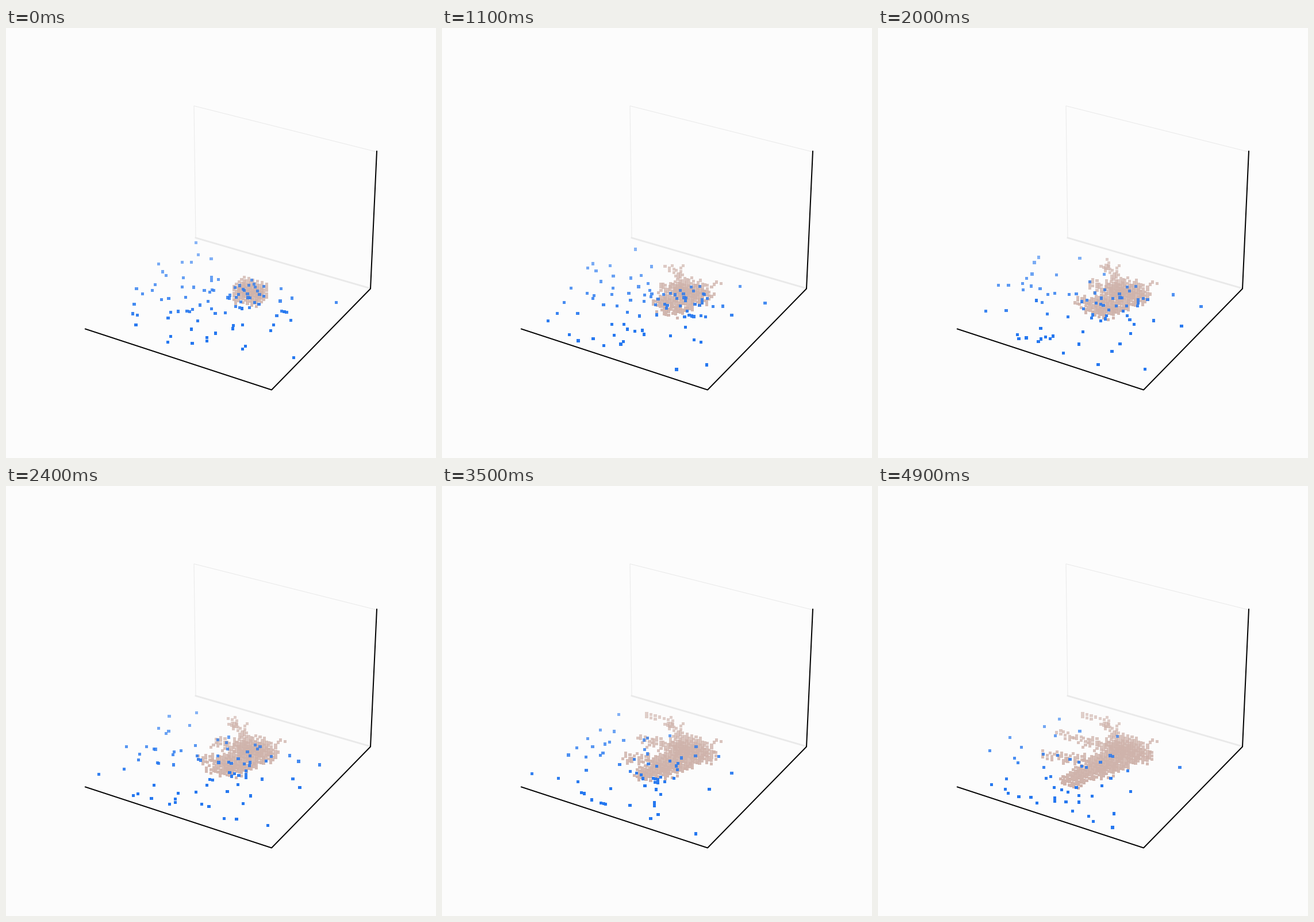
Recreate the animation shown at these times as a matplotlib script. Size 748x748 px, loop 5000 ms.

```python
import numpy as np
import matplotlib.pyplot as plt
from matplotlib.animation import FuncAnimation

SIZE, FRAMES, INTERVAL = 748, 50, 100
CELLS, LIFT = 40, 5.65                 # floor cells per side, pixels per layer
PAPER, BLUE, BROWN = "#fcfcfc", (0.15, 0.47, 0.94), (0.81, 0.70, 0.67)
ORIGIN = np.array([18.86, 16.96, 0])   # lattice position of the seed corner
WALKERS, RESTING = 82, 30

rng = np.random.default_rng(11)

# Perspective of the floor: lattice fractions to homogeneous pixels
FLOOR = np.array([[272.73, -204.13, 330],
                  [65.65, 112.02, 365],
                  [-0.04933, -0.0879, 1]])

# Branches of the aggregate: key points, first and last frame,
# half-widths along i, j, k and the number of particles caught
BRANCHES = [
    ([(2, 1, 0.5), (-1, 12, 1)], 2, 49, (2.6, 1.4, 1.2), 900),
    ([(6, -3, 1.5), (8, -3, 1.5)], 2, 47, (0.5, 1.6, 1.6), 150),
    ([(6, -4, 4), (8, -6, 4)], 1, 8, (0.5, 0.5, 0), 14),
    ([(-1, -5, 4), (-1, -7, 5)], 1, 6, (0.5, 0.5, 0), 8),
    ([(0, -5, 4), (-3, -5, 4), (-4, -8, 4), (-7, -8, 4), (-10, -8, 3)],
     1, 35, (0.5, 0.6, 0.8), 60),
    ([(-1, 0, 3), (-4, 1, 4), (-10, 2, 5)], 2, 49, (0.5, 0.8, 1.2), 75),
    ([(-1, 3, 1), (-6, 5, 1), (-10, 7, 2)], 8, 49, (0.6, 1, 1), 75),
]


def project(cells):
    """Lattice (i, j, k) to screen pixels."""
    uv1 = np.column_stack([cells[:, :2] / CELLS, np.ones(len(cells))])
    x, y, w = FLOOR @ uv1.T
    return np.column_stack([x / w, y / w - LIFT * cells[:, 2]])


def seed_block():
    """A solid block, then loose particles caught on its faces."""
    grid = np.mgrid[-1:7, -5:2, -1:5].reshape(3, -1).T
    outside = ((grid < (0, -4, 0)) | (grid > (5, 0, 4))).sum(axis=1)
    births = np.where(outside == 0, 0, rng.integers(0, 30, len(grid)))
    keep = (outside == 0) | ((outside == 1) & (rng.random(len(grid)) < 0.7))
    return grid[keep], births[keep]


def grow(points, first, last, width, count):
    """Particles scattered along a path, thinning toward its tip."""
    s = np.linspace(0, 1, count)
    knots = np.linspace(0, 1, len(points))
    centre = np.column_stack([np.interp(s, knots, axis)
                              for axis in zip(*points)])
    spread = rng.uniform(-1, 1, (count, 3)) * width
    cells = np.rint(centre + spread * (1.15 - 0.5 * s[:, None])).astype(int)
    return cells, np.rint(first + s * (last - first)).astype(int)


def aggregate():
    """All fixed cells, each with its earliest birth frame."""
    parts = [seed_block()] + [grow(*branch) for branch in BRANCHES]
    cells = np.vstack([c for c, _ in parts])
    births = np.concatenate([b for _, b in parts])
    order = np.argsort(births, kind="stable")
    cells, index = np.unique(cells[order], axis=0, return_index=True)
    return cells, births[order][index]


def walk():
    """Random walks on the lattice, drifting to the front left."""
    low, high = np.array([0, 3, 1]), np.array([39, 40, 3])
    cells = np.rint(rng.normal((17, 23, 2), (9, 8.5, 0.8), (WALKERS, 3)))
    path = []
    for _ in range(FRAMES):
        cells = np.where(cells < low, 2 * low - cells, cells)
        cells = np.where(cells > high, 2 * high - cells, cells)
        path.append(project(cells))
        drift = rng.random(cells.shape) < (0.05, 0.14, 0)
        cells = cells + rng.integers(-1, 2, cells.shape) + drift * (-1, 1, 0)
    return path


def shade(color, y, far):
    """Fade colours toward the back of the floor."""
    rgba = np.tile((*color, 1.0), (len(y), 1))
    rgba[:, 3] = np.interp(y, [390, 520], [far, 1])
    return rgba


cells, births = aggregate()
brown_xy = project(cells + ORIGIN)
order = np.argsort(brown_xy[:, 1])
brown_xy, births = brown_xy[order], births[order]

# A few particles pause on the aggregate before they turn brown
perch = rng.choice(len(births), RESTING, replace=False)
stay = rng.integers(5, 30, RESTING)

paths = walk()
lifetimes = rng.uniform(1, 150, WALKERS)

fig = plt.figure(figsize=(SIZE / 100, SIZE / 100), dpi=100, facecolor=PAPER)
ax = fig.add_axes([0, 0, 1, 1])
ax.set(xlim=(0, SIZE), ylim=(SIZE, 0))
ax.axis("off")


def line(points, color, width):
    x, y = np.array(points).T
    ax.plot(x, y + 0.5, color=color, lw=width * 0.72, zorder=1)


line([(330, 365), (327, 135), (645, 215)], "#e9e9e9", 1)
line([(330, 364.5), (634, 452.5)], "#e9e9e9", 2.8)
line([(138, 523), (462, 629), (634, 453), (645, 214)], "black", 2)

dot = dict(marker="s", s=(5.2 * 0.72) ** 2, linewidths=0)
brown = ax.scatter([], [], zorder=2, **dot)
blue = ax.scatter([], [], zorder=3, **dot)


def update(n):
    grown = brown_xy[births <= n]
    brown.set_offsets(grown + 0.5)
    brown.set_facecolors(shade(BROWN, grown[:, 1], 0.6))

    resting = (births[perch] <= n) & (n < births[perch] + stay)
    dots = np.vstack([paths[n][lifetimes > n], brown_xy[perch[resting]]])
    blue.set_offsets(dots + 0.5)
    blue.set_facecolors(shade(BLUE, dots[:, 1], 0.54))
    return brown, blue


anim = FuncAnimation(fig, update, frames=FRAMES, interval=INTERVAL,
                     repeat=True, repeat_delay=0)
plt.show()
```
